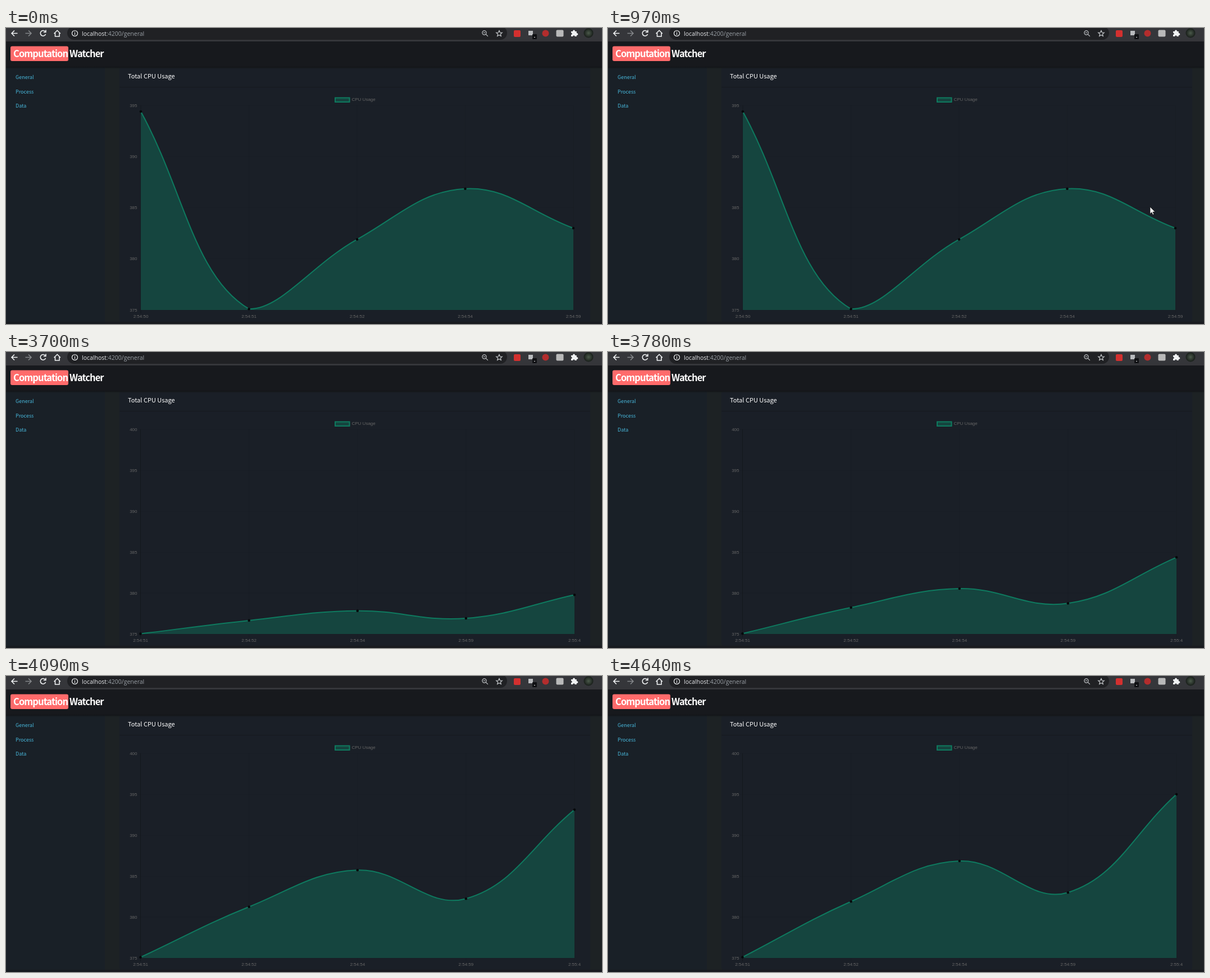
An HTML page that plays this animation: 1061 px wide and 528 px high, repeating every 8 s.

```html
<!DOCTYPE html>
<html lang="en">
<head>
<meta charset="utf-8">
<title>Total CPU Usage</title>
<style>
  html, body { margin: 0; width: 100%; height: 100%; overflow: hidden; background: #1d2224; }
  svg { display: block; width: 1061px; height: 528px; }
  text { font-family: "Noto Sans CJK JP", "Noto Sans CJK SC", "Open Sans", sans-serif; }
  .brand { font-size: 16.5px; font-weight: 700; letter-spacing: -.9px; fill: #fff; }
  .link { font-size: 9px; fill: #48b8dc; }
  .url { font: 10.5px "Open Sans", "Noto Sans", sans-serif; fill: #9aa0a6; }
  .chart text { font: 8px "Liberation Sans", Arial, sans-serif; fill: #666; }
  .icon { fill: none; stroke: #f1f3f4; stroke-width: 1.6; }
</style>
</head>
<body>
<svg viewBox="0 0 1061 528">
  <defs>
    <radialGradient id="photo"><stop stop-color="#4b5a4b"/><stop offset="1" stop-color="#171d19"/></radialGradient>
    <linearGradient id="shade" x2="0" y2="1"><stop stop-color="#121417"/><stop offset="1" stop-color="#121417" stop-opacity="0"/></linearGradient>
  </defs>

  <!-- page -->
  <rect y="70" width="176" height="458" fill="#192027"/>
  <rect x="202" y="71" width="838" height="453" rx="3" fill="#1a1f27"/>
  <path d="M202 105.5H1040" stroke="#15191f"/>
  <rect y="24" width="1061" height="46" fill="#17191d"/>
  <rect y="69" width="1061" height="4" fill="url(#shade)"/>
  <rect y="524" width="1061" height="4" fill="#17191d" opacity=".7"/>
  <rect x="8" y="32.500" width="103" height="26.500" rx="3" fill="#ff6b6b"/>
  <text class="brand" x="13" y="52">Computation</text>
  <text class="brand" x="113" y="52">Watcher</text>
  <text class="link" x="17" y="91">General</text>
  <text class="link" x="17" y="116.500">Process</text>
  <text class="link" x="17" y="142">Data</text>
  <text x="217" y="89.500" font-size="11" font-weight="500" fill="#fff">Total CPU Usage</text>

  <!-- browser bar -->
  <rect width="1061" height="24" fill="#35363a"/>
  <rect x="109" y="-3" width="783" height="24" rx="12" fill="#202124"/>
  <g class="icon">
    <path d="M20.500 9.500H10M15 4.500l-5 5 5 5"/>
    <path d="M34.500 9.500H45M40 4.500l5 5-5 5" stroke="#85878a"/>
    <path d="M69.700 6.200A4.800 4.800 0 1 0 70.600 11M70.900 3.500v4h-4"/>
    <path d="M85.500 10l5.700-5.700 5.700 5.700M87.500 9v6h7.500V9"/>
    <g stroke-width="1.200">
      <circle cx="122.500" cy="9.500" r="5"/><path d="M122.500 8.500v4M122.500 6.300v1.300"/>
    </g>
    <g stroke="#c4c7ca" stroke-width="1.200">
      <circle cx="851.500" cy="8.500" r="3.600"/><path d="M854.200 11.200l3.700 3.700M849.800 8.500h3.400"/>
      <path d="M878 4.500l1.500 3.500 3.800.300-2.900 2.500.9 3.700-3.300-2-3.300 2 .9-3.700-2.900-2.500 3.800-.300z"/>
    </g>
  </g>
  <text class="url" x="135" y="13.500"><tspan fill="#e8eaed">localhost</tspan>:4200/general</text>
  <rect x="904" y="4" width="12" height="12" rx="2" fill="#d3302f"/>
  <rect x="930" y="5" width="8" height="8" fill="#b9bbbe"/>
  <rect x="937" y="11" width="8" height="9" rx="1" fill="#101114"/>
  <path d="M940 16.500h2" stroke="#ddd"/>
  <circle cx="960.500" cy="9.500" r="6" fill="#b32d2d"/>
  <rect x="979.500" y="3.500" width="13" height="12" rx="2" fill="#b9b9b9"/>
  <path d="M1006 6h3.200a1.900 1.900 0 1 1 3.600 0h3v3.200a1.900 1.900 0 1 1 0 3.600V15h-3.200a1.700 1.700 0 1 0-3.400 0H1006v-3a1.700 1.700 0 1 0 0-3.400z" fill="#f1f3f4"/>
  <circle cx="1037" cy="9" r="8.500" fill="url(#photo)"/>

  <!-- chart -->
  <g class="chart">
    <rect x="586" y="124.500" width="25.500" height="7.500" fill="#15453f" stroke="#0e7a5f" stroke-width="2"/>
    <text x="615.500" y="130.300">CPU Usage</text>
    <g id="axes"></g>
    <path id="area" fill="#15453f"/>
    <path id="line" fill="none" stroke="#0e7a5f" stroke-width="2"/>
    <g id="dots"></g>
  </g>
  <path id="cursor" d="M0 0v12.500l2.900-2.700 2 4.400 2-.900-2-4.200h4z" fill="#fff" stroke="#111" stroke-width=".7"/>
</svg>
<script>
const LOOP = 8000, TOP = 138, BOTTOM = 503, SWITCH = 3700, GROW_FROM = 3634;
const $ = id => document.getElementById(id);

const before = {
  left: 240, right: 1010, max: 395,
  values: [394.4, 375.1, 381.9, 386.85, 383],
  labels: ['2:54:50', '2:54:51', '2:54:52', '2:54:54', '2:54:59']
};
const after = {
  left: 239.5, right: 1012, max: 400,
  values: [375.1, 381.9, 386.85, 383, 395],
  labels: ['2:54:51', '2:54:52', '2:54:54', '2:54:59', '2:55:4']
};

// Moments at which the growing chart is redrawn
const ticks = [3700, 3780, 3850, 3930, 4010, 4080, 4160, 4240, 4320, 4390, 4470, 4540, 4640];

// Pointer stops: time, x, y (no position = hidden)
const stops = [
  [0], [430, 1053, 515], [510], [740, 1046, 498], [820, 1004, 396], [890, 974, 338],
  [970, 965, 319], [1200, 971, 318], [1280, 1003, 311], [1350, 1040, 302], [1430, 1059, 298], [1980]
];

const xAt = (c, i) => c.left + (c.right - c.left) * i / 4;
const yAt = (c, v) => BOTTOM - (BOTTOM - TOP) * (v - 375) / (c.max - 375);
const clamp = y => Math.max(TOP, Math.min(BOTTOM, y));

function drawAxes(c) {
  let out = '';
  for (let v = 375; v <= c.max; v += 5) {
    const y = yAt(c, v);
    out += `<path d="M${c.left - 6} ${y}H${c.right}" stroke="#000" stroke-opacity=".08" stroke-width=".7"/>
      <text x="233.5" y="${y + 2.7}" text-anchor="end">${v}</text>`;
  }
  c.labels.forEach((label, i) => {
    const x = xAt(c, i);
    out += `<path d="M${x} ${TOP}V${BOTTOM + 6}" stroke="#000" stroke-opacity="${i ? .08 : .3}" stroke-width=".8"/>
      <text x="${x}" y="517" text-anchor="middle">${label}</text>`;
  });
  $('axes').innerHTML = out;
}

// Spline with tension 0.4, handles kept inside the plot
function spline(pts) {
  const handles = pts.map(([x, y], i) => {
    const p = pts[i - 1] || pts[i], n = pts[i + 1] || pts[i];
    const a = Math.hypot(x - p[0], y - p[1]), b = Math.hypot(n[0] - x, n[1] - y);
    const ka = .4 * a / (a + b), kb = .4 * b / (a + b);
    const dx = n[0] - p[0], dy = n[1] - p[1];
    return { in: [x - ka * dx, clamp(y - ka * dy)], out: [x + kb * dx, clamp(y + kb * dy)] };
  });
  return 'M' + pts[0] + pts.slice(1).map((p, i) =>
    `C${handles[i].out} ${handles[i + 1].in} ${p}`).join('');
}

function drawCurve(c, grow) {
  const pts = c.values.map((v, i) => [xAt(c, i), BOTTOM + (yAt(c, v) - BOTTOM) * grow]);
  const d = spline(pts);
  $('line').setAttribute('d', d);
  $('area').setAttribute('d', `${d}V${BOTTOM}H${c.left}Z`);
  $('dots').innerHTML = pts.map(([x, y]) => `<circle cx="${x}" cy="${y}" r="2.3" fill="#06090b"/>`).join('');
}

let shown;
function draw(t) {
  const chart = t < SWITCH ? before : after;
  if (chart !== shown) drawAxes(shown = chart);
  let grow = 1;
  if (chart === after) {
    const p = Math.min(1, (ticks.findLast(k => k <= t) - GROW_FROM) / 1000);
    grow = 1 - (1 - p) ** 4;
  }
  drawCurve(chart, grow);

  const [, x, y] = stops.findLast(s => s[0] <= t);
  $('cursor').setAttribute('visibility', x ? 'visible' : 'hidden');
  if (x) $('cursor').setAttribute('transform', `translate(${x} ${y})`);
}

const start = performance.now();
function frame() {
  draw((performance.now() - start) % LOOP);
  requestAnimationFrame(frame);
}
frame();
</script>
</body>
</html>
```
